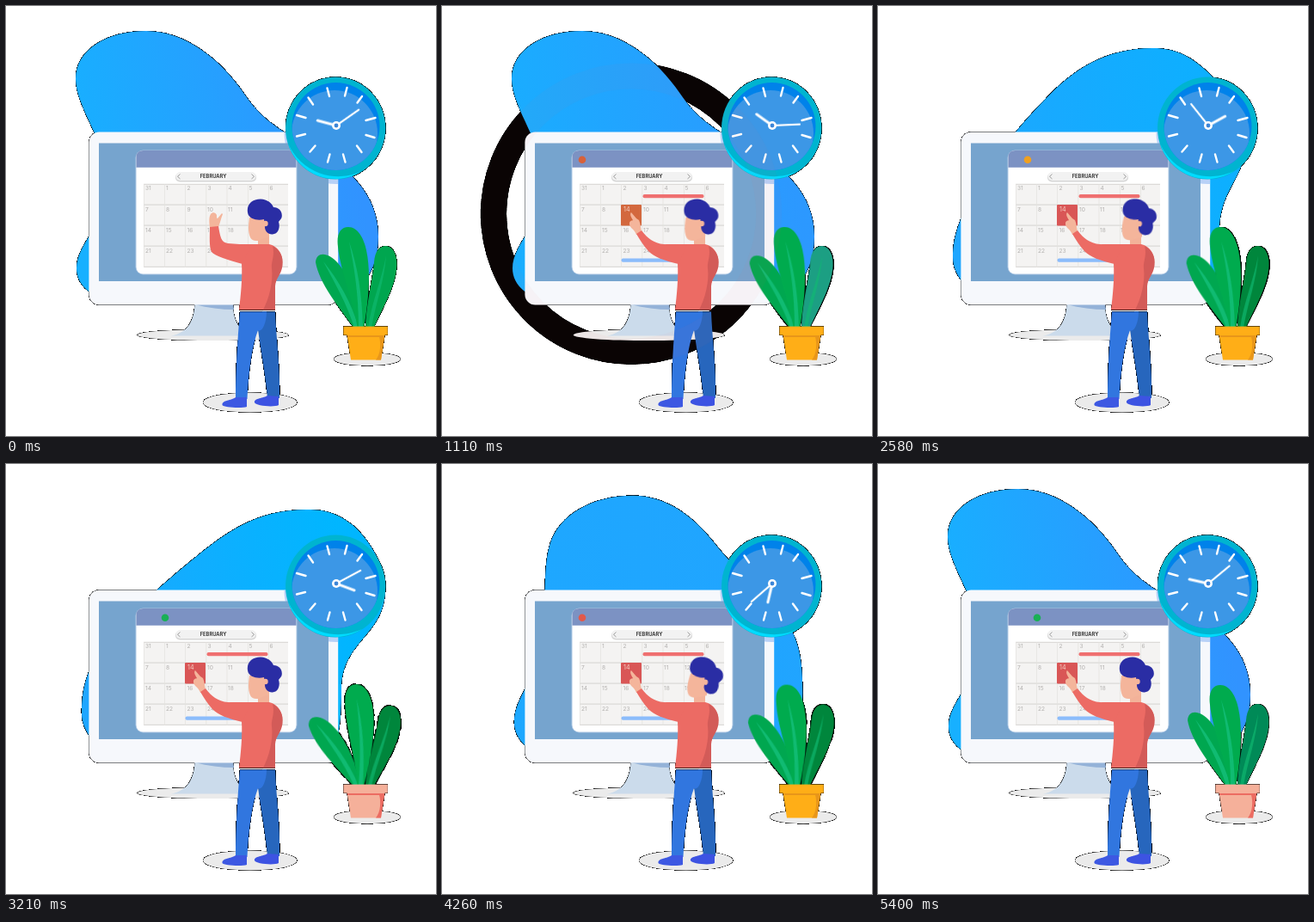
Write an HTML page without scripts that moves like this. It is 500x500 px and loops after 5.43 s.

```html
<!DOCTYPE html>
<html lang="en">
<head>
<meta charset="utf-8">
<title>Calendar planning</title>
<style>
html, body { margin: 0; width: 100%; height: 100%; overflow: hidden; background: #fff; }
svg { display: block; width: 100vw; height: 100vh; }
text { font-family: Inter, Roboto, sans-serif; }
svg * { animation-duration: 5430ms; animation-iteration-count: infinite; animation-timing-function: linear; }

/* background shape */
.blob { animation-name: morph; animation-timing-function: cubic-bezier(.52, 0, .48, 1); }
@keyframes morph {
  0%, 22.2%, 92.1%, 100% { d: path("M81 85 C81 50 118 29 163 29 C208 29 250 62 277 102 C292 124 310 141 345 158 C400 186 433 220 433 268 C433 320 400 345 360 345 C280 345 180 345 130 345 C100 340 82 325 82 305 C82 275 120 250 120 205 C120 165 81 118 81 85Z"); }
  58.75% { d: path("M222 107 C255 81 290 53 350 53 C372 53 384 57 402 70 C412 77.5 441 110 441 145 C441 200 390 205 390 262 C390 310 385 345 360 345 C280 345 180 345 130 345 C104 330 88 310 88 290 C88 262 93 243 110 215 C127 187 191 132 222 107Z"); }
}
.tone1 { animation-name: tone1; }
.tone2 { animation-name: tone2; }
@keyframes tone1 { 0%, 16%, 95%, 100% { stop-color: #17b0ff; } 36%, 59%, 75% { stop-color: #1fa6ff; } }
@keyframes tone2 { 0%, 16%, 95%, 100% { stop-color: #3193ff; } 32%, 77% { stop-color: #1fa6ff; } 59% { stop-color: #00b6ff; } }

/* clock */
.hour, .minute { transform-origin: 384px 139px; stroke: #fff; stroke-linecap: round; }
.hour { animation-name: hour; }
.minute { animation-name: minute; }
@keyframes hour { 0%, 15.6% { transform: rotate(285deg); } 100% { transform: rotate(645deg); } }
@keyframes minute { 0%, 16.7% { transform: rotate(55deg); } 100% { transform: rotate(775deg); } }

/* plant */
.leaf { transform-origin: 413px 373px; animation-name: sway; animation-timing-function: ease-in-out; }
.early { animation-name: swayEarly; }
.vein { fill: #10bb72; }
@keyframes sway {
  0%, 18.6%, 45.9%, 73.1%, 100% { transform: rotate(0); }
  32.2%, 59.5%, 86.6% { transform: rotate(var(--a)); }
}
@keyframes swayEarly {
  0%, 15%, 43.5%, 71.5%, 100% { transform: rotate(0); }
  30%, 58%, 85.7% { transform: rotate(var(--a)); }
}
.shade { fill: #00a64f; animation-name: shade; animation-timing-function: step-end; }
@keyframes shade {
  0%, 26% { fill: #00a64f; }
  17% { fill: #1c9f83; }
  40% { fill: #00863c; }
  95.9% { fill: #008a57; }
}
.pot { animation-name: pot; animation-timing-function: step-end; }
.potDark { animation-name: potDark; animation-timing-function: step-end; }
@keyframes pot { 0%, 64% { fill: #ffae17; } 48.1%, 95.9% { fill: #f5b09a; } }
@keyframes potDark { 0%, 64% { fill: #e8961a; } 48.1%, 95.9% { fill: #ec6c62; } }

/* window */
.dot { animation-name: dot; animation-timing-function: step-end; }
@keyframes dot {
  0% { transform: none; fill: transparent; }
  16.2% { transform: none; fill: #d8613a; }
  32.1%, 79.9% { transform: translateX(11px); fill: #f0a020; }
  48.1%, 95.9% { transform: translateX(22px); fill: #18b055; }
  64% { transform: none; fill: #e2594b; }
}
.cell { animation-name: cell; animation-timing-function: step-end; }
@keyframes cell { 0% { opacity: 0; fill: #d3683e; } 12% { opacity: 1; fill: #d3683e; } 26% { opacity: 1; fill: #d65f42; } 40%, 100% { opacity: 1; fill: #d95656; } }
.mark { animation-name: mark; animation-timing-function: step-end; }
@keyframes mark { 0% { opacity: 0; } 12%, 100% { opacity: 1; } }
.bar { transform-box: fill-box; transform-origin: 0 50%; animation-name: grow; animation-timing-function: ease-out; }
@keyframes grow { 0%, 12.5% { transform: scaleX(0); } 18%, 100% { transform: scaleX(1); } }
.ripple { transform-origin: 220px 241.5px; animation-name: ripple; }
@keyframes ripple {
  0%, 12.4% { transform: scale(0); opacity: 0; }
  12.5% { transform: scale(0); opacity: .5; }
  20.45% { transform: scale(1); opacity: .04; }
  20.9% { transform: scale(1.03); opacity: .03; }
  20.91%, 100% { transform: scale(0); opacity: 0; }
}

/* person */
.head { transform-origin: 300px 278px; animation-name: nod; animation-timing-function: ease-in-out; }
@keyframes nod { 0%, 16.2%, 58.1%, 100% { transform: rotate(0); } 37.1%, 79% { transform: rotate(10.5deg); } }
.sleeve { animation-name: sleeve; animation-timing-function: ease-in-out; }
.hand { animation-name: hand; animation-timing-function: ease-in-out; }
@keyframes sleeve {
  0%, 2% { d: path("M247 256 C249 268 250 275 258 276 L285 278 L275 300 C258 295 243 291 239 286 C236 280 237 268 237 257Z"); }
  12%, 100% { d: path("M232 261 C239 270 246 276 258 277 L285 278 L275 300 C258 296 247 292 240 285 C234 278 230 272 226 265Z"); }
}
@keyframes hand {
  0%, 2% { d: path("M237 258 C236 250 236 245 238 242 C240 239 244 240 245 243 C245 246 245 247 246 247 L251 241 L252 242 C250 247 249 252 247 257Z"); }
  12%, 100% { d: path("M226 266 C224 259 217 258 218 252 C219 249 221 250 222 249 C220 246 218 242 220 240 L226 247 L229 249 C231 254 231 258 232 262Z"); }
}
</style>
</head>
<body>
<svg viewBox="0 0 500 500">
  <defs>
    <linearGradient id="sky" gradientUnits="userSpaceOnUse" x1="80" y1="210" x2="400" y2="150">
      <stop class="tone1" offset="0"/>
      <stop class="tone2" offset="1"/>
    </linearGradient>
    <!-- every translucent pixel gets a black backing -->
    <filter id="edge" filterUnits="userSpaceOnUse" x="0" y="0" width="500" height="500" color-interpolation-filters="sRGB">
      <feComponentTransfer in="SourceAlpha" result="back"><feFuncA type="linear" slope="50"/></feComponentTransfer>
      <feMerge><feMergeNode in="back"/><feMergeNode in="SourceGraphic"/></feMerge>
    </filter>
    <clipPath id="frame"><rect x="97" y="147" width="289" height="200" rx="12"/></clipPath>
    <clipPath id="dial"><circle cx="383.5" cy="140" r="51"/></clipPath>
  </defs>

  <g filter="url(#edge)">
    <path class="blob" fill="url(#sky)"/>

    <!-- monitor -->
    <ellipse cx="240.7" cy="382.5" rx="88" ry="6.6" fill="#ebebeb"/>
    <path d="M219.5 345H264C264 365 270 380 291 383.5H192C212 380 219 365 219.5 345Z" fill="#cbdbeb"/>
    <path d="M219.5 346H264L265 353C250 353 235 351 219.5 347Z" fill="#94b2d8"/>
    <rect x="96.4" y="146.6" width="289.8" height="200.8" rx="12" fill="#f6f8fc"/>
    <circle cx="383.5" cy="147" r="60" fill="#a9c9f7" opacity=".8" clip-path="url(#frame)"/>
    <rect x="108" y="159.5" width="267" height="160.5" fill="#76a4ce"/>

    <!-- calendar window -->
    <rect x="150.5" y="167.5" width="188" height="145" rx="9" fill="#a9c4e2"/>
    <rect x="151.5" y="168" width="186" height="143.5" rx="8" fill="#fff"/>
    <path d="M151.5 187.7V176Q151.5 168 159.5 168H329.5Q337.5 168 337.5 176V187.7Z" fill="#7c92c3"/>
    <circle class="dot" cx="163" cy="178.7" r="4.3" fill="transparent"/>
    <rect x="197" y="194" width="94" height="10.5" rx="5" fill="#d6d6d6"/>
    <rect x="197.5" y="193" width="93" height="10" rx="5" fill="#f2f2f2"/>
    <path d="M202.5 195.5L199.5 198.3L202.5 201M285.5 195.5L288.5 198.3L285.5 201" fill="none" stroke="#888" stroke-width=".8"/>
    <text x="241" y="200.2" text-anchor="middle" font-size="5.8" font-weight="600" fill="#222">FEBRUARY</text>
    <rect x="160" y="207" width="168" height="97" fill="#f4f3f2"/>
    <path d="M160 207.3H328M160 231.2H328M160 255.2H328M160 279.2H328M160 303.3H328" stroke="#dcdad8" stroke-width="1.3"/>
    <path d="M160.5 207V304M184.5 207V304M208.5 207V304M232.8 207V304M257 207V304M281.5 207V304M305.5 207V304" stroke="#e3e1df" stroke-width=".7"/>
    <g font-size="6.6" fill="#b2b0ae">
      <text y="214"><tspan x="162">31</tspan><tspan x="186">1</tspan><tspan x="210.5">2</tspan><tspan x="234.5">3</tspan><tspan x="258.5">4</tspan><tspan x="282.5">5</tspan><tspan x="306.5">6</tspan></text>
      <text y="238.5"><tspan x="162">7</tspan><tspan x="186">8</tspan><tspan x="210.5">9</tspan><tspan x="234">10</tspan><tspan x="258">11</tspan><tspan x="282">12</tspan></text>
      <text y="262.5"><tspan x="162">14</tspan><tspan x="186">15</tspan><tspan x="210.5">16</tspan><tspan x="234">17</tspan><tspan x="258">18</tspan><tspan x="282">19</tspan></text>
      <text y="286.5"><tspan x="162">21</tspan><tspan x="186">22</tspan><tspan x="210.5">23</tspan><tspan x="234">24</tspan></text>
    </g>
    <rect class="cell" x="208" y="231" width="24" height="24.5" rx="1"/>
    <text class="mark" x="211" y="239" font-size="7.2" fill="#f5d0c5">14</text>
    <rect class="bar" x="233.5" y="219" width="71" height="4.2" rx="2" fill="#ef7070"/>
    <rect class="bar" x="208.5" y="293.5" width="80" height="4.2" rx="2" fill="#8bbcfb"/>

    <!-- clock -->
    <ellipse cx="383.2" cy="142" rx="58.2" ry="59.5" fill="#00b4d0"/>
    <path d="M328 160A58 59 0 0 0 414 192A64 64 0 0 1 328 160Z" fill="#00dcff"/>
    <circle cx="383.5" cy="140" r="51" fill="#0082ea"/>
    <circle cx="382" cy="148" r="50" fill="#3c97e6" clip-path="url(#dial)"/>
    <path d="M396.5 95L394 104.5M414 105L408.5 112.500M429.500 130L418.500 133M428.500 153L418.500 150M413.500 170L408 162.500M394.500 181.500L392 172.500M374 181.500L376.500 172.500M353.500 169.500L359.500 162.500M338 151.500L348 149M338 127L348.500 130M351.500 106.500L357 114.500M373.500 95.500L376 105" stroke="#fff" stroke-width="2.4" stroke-linecap="round"/>
    <path class="hour" d="M384 139V116.500" stroke-width="3"/>
    <path class="minute" d="M384 139V107" stroke-width="2.2"/>
    <circle cx="384" cy="139" r="5" fill="#fff"/>
    <circle cx="384" cy="139" r="2.4" fill="#3c86d8"/>

    <!-- plant -->
    <ellipse cx="420" cy="410.5" rx="38.8" ry="7.7" fill="#ebebeb"/>
    <g class="leaf" style="--a:3.5deg">
      <path class="shade" d="M418 376C418 350 426 320 428 298C429 285 434 279 442 279C451 280 455 290 454.500 302C453 328 437 352 427 376Z"/>
      <path class="vein" d="M442 290C437 318 425 345 421 374H425C430 345 440 320 442 290Z" opacity=".65"/>
    </g>
    <g class="leaf early" style="--a:-6.5deg">
      <path d="M406 376C388 352 364 322 360 298C361 284 376 287 386 299C402 318 412 350 411 376Z" fill="#00a750"/>
      <path class="vein" d="M369 297C382 322 396 345 405 374H410C402 345 386 318 369 297Z"/>
    </g>
    <g class="leaf" style="--a:5deg">
      <path d="M409 376C405 345 389 310 386 280C384 265 389 257 398 257C409 257 416 270 419 284C425 312 421 345 416 376Z" fill="#00ab4e"/>
      <path class="vein" d="M399 274C405 305 410 335 410 374H415C414 335 409 303 399 274Z"/>
    </g>
    <path class="pot" fill="#ffae17" d="M396.5 382H440.5L436 411.5H401Z"/>
    <path class="potDark" fill="#e8961a" d="M396.7 383H440.3L436 411.5H430C436 404 436 392 434 385H397Z"/>
    <rect class="pot" x="392.4" y="372.6" width="51.4" height="10" fill="#ffae17"/>

    <!-- person -->
    <ellipse cx="283.7" cy="461" rx="54.5" ry="11.5" fill="#ebebeb"/>
    <path d="M298 355.5H313C314 385 319 420 318 456H304C302 430 296 400 293 376Z" fill="#2766bd"/>
    <path d="M272 355.5H303C303 370 297 380 293 377C286 396 282 425 280.5 457H267C267 425 269 390 272 355.5Z" fill="#3176df"/>
    <path d="M267 455C262 459 251 458 251.500 464C253 467 275 468 280 466V455Z" fill="#3d58e2"/>
    <path d="M304 453C300 456 288 456 289 461C290 465 312 467 317 464V454Z" fill="#3d53e2"/>
    <path d="M293 264H306V279C302 283 296 282 293 278Z" fill="#f3b299"/>
    <path d="M260 277H306C315 279 323 288 321 300C319 313 313 317 313 326V353.3H271C273 336 275 318 274 299Z" fill="#ec6b64"/>
    <path d="M310 279C318 283 323 291 321.500 302C320 313 313 317 313 326V353.3H299C306 340 311 320 309 305C308 298 313 290 310 279Z" fill="#d35b58"/>
    <path class="hand" fill="#f4b59b"/>
    <path class="sleeve" fill="#ec6b64"/>
    <g class="head">
      <path d="M283 246C282 254 281 262 284 269C286 274 293 274 298 271L306 268V246Z" fill="#f4b59b"/>
      <path d="M281 240C279.500 231 286 224.500 296 224.500C304 225 309 229 311 234C318 234 322 240 320.500 246C320 248 318 249 317 251C319 257 317 265 310 265.500C305 266 301 262 301 257L300 248C293 250 282 248 281 240Z" fill="#2a2da4"/>
      <circle cx="301.5" cy="253" r="3.2" fill="#f4b59b"/>
    </g>

    <circle class="ripple" cx="220" cy="241.5" r="160" fill="none" stroke="#eb6a62" stroke-width="30"/>
  </g>
</svg>
</body>
</html>
```
